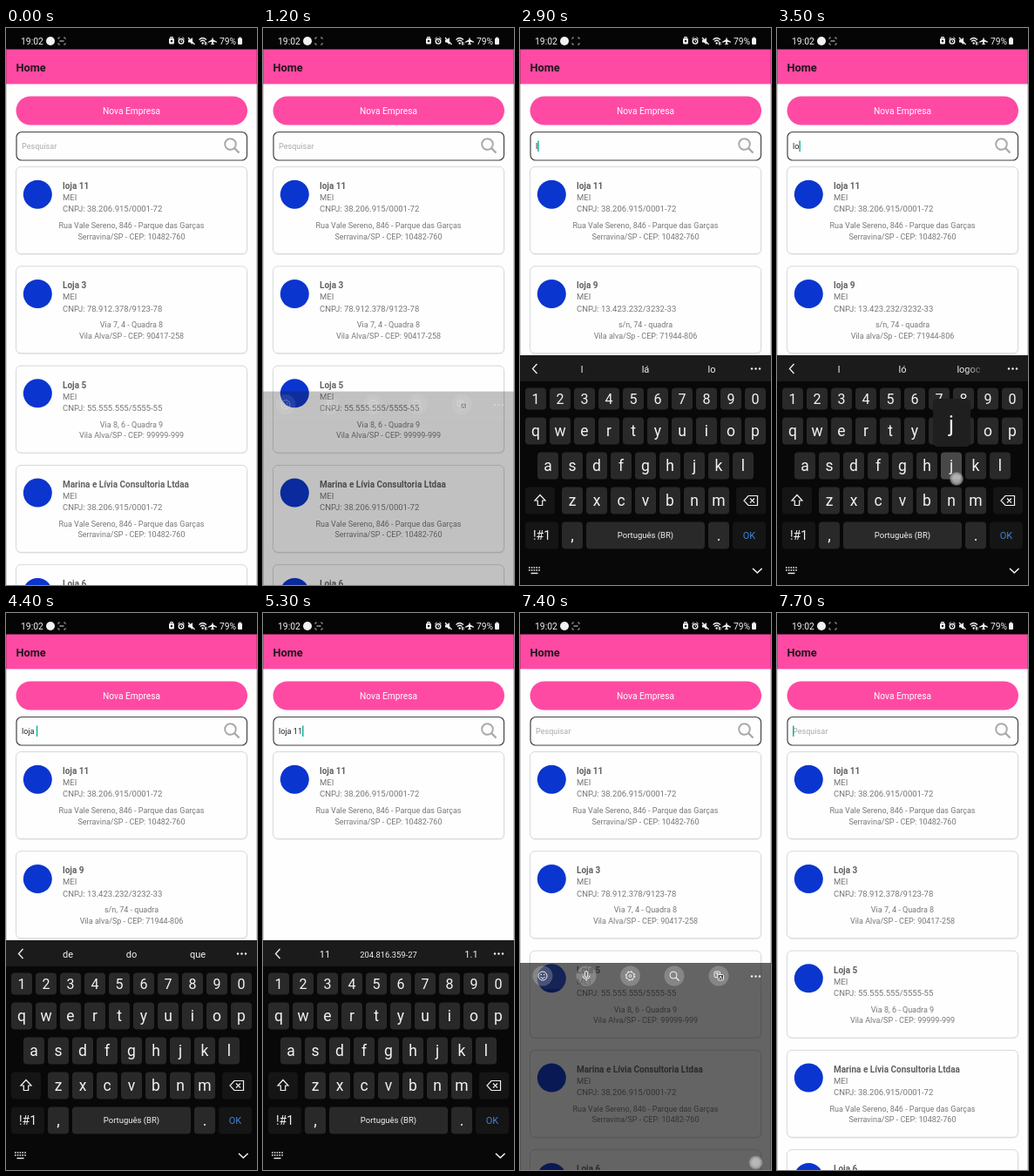
Write an HTML page that moves like this. It is 288 by 640 pixels and loops after 7800 ms.

```html
<!DOCTYPE html>
<html lang="pt-BR">
<head>
<meta charset="utf-8">
<title>Home</title>
<style>
html, body { margin: 0; width: 100%; height: 100%; overflow: hidden; background: #fefefe; }
svg { display: block; width: 288px; height: 640px; font-family: Roboto, sans-serif; }
</style>
</head>
<body>
<svg id="stage" viewBox="0 0 288 640"></svg>
<script>
const LOOP = 7800, STEP = 100;
const stage = document.getElementById('stage');
const ruler = document.createElement('canvas').getContext('2d');
const PINK = '#ff4aa4', WHITE = '#f2f2f2';

// Drawing helpers
const rect = (x, y, w, h, r, fill, more = '') =>
  `<rect x="${x}" y="${y}" width="${w}" height="${h}" rx="${r}" fill="${fill}" ${more}/>`;
const circle = (x, y, r, fill, more = '') => `<circle cx="${x}" cy="${y}" r="${r}" fill="${fill}" ${more}/>`;
const text = (s, x, y, size, fill, more = '') =>
  `<text x="${x}" y="${y}" font-size="${size}" fill="${fill}" ${more}>${s}</text>`;
const mid = (s, x, y, size, fill, more = '') => text(s, x, y, size, fill, 'text-anchor="middle" ' + more);
const line = (d, color = WHITE, w = 1, more = '') =>
  `<path d="${d}" fill="none" stroke="${color}" stroke-width="${w}" ${more}/>`;
const group = (s, more) => `<g ${more}>${s}</g>`;
const clamp = v => Math.max(0, Math.min(1, v));

// Companies: name, tax number, street, city
const first = ['loja 11', '38.206.915/0001-72', 'Rua Vale Sereno, 846 - Parque das Garças', 'Serravina/SP - CEP: 10482-760'];
const allCards = [
  first,
  ['Loja 3', '78.912.378/9123-78', 'Via 7, 4 - Quadra 8', 'Vila Alva/SP - CEP: 90417-258'],
  ['Loja 5', '55.555.555/5555-55', 'Via 8, 6 - Quadra 9', 'Vila Alva/SP - CEP: 99999-999'],
  ['Marina e Lívia Consultoria Ltdaa', '38.206.915/0001-72', first[2], first[3]],
  ['Loja 6', '66.666.666/6666-66', 'Via 9, 2 - Quadra 7', 'Vila Alva/SP - CEP: 88888-888']
];
const loCards = [first, ['loja 9', '13.423.232/3232-33', 's/n, 74 - quadra', 'Vila alva/Sp - CEP: 71944-806']];

// Typing
const WORD = 'loja 11';
const taps = [2700, 3000, 3400, 3800, 4200, 4500, 4800];
const PRESS = 200;
const edits = [...taps.map(t => t + PRESS), ...taps.map((_, i) => 5800 + 150 * i)];
const LONG = '204.816.359-27';
const hints = {
  1: ['l', 'lá', 'lo'], 2: ['l', 'ló', 'logoc'], 3: ['loj', 'loja', 'lojas'], 4: ['loja', 'lojas', 'Loja'],
  5: ['de', 'do', 'que'], 6: ['1', '10', '1.1'], 7: ['11', LONG, '1.1']
};

const rows = [['1234567890', 18, 426, 25], ['qwertyuiop', 18, 463, 31], ['asdfghjkl', 32, 503, 31], ['zxcvbnm', 60, 543, 31]];
const keyAt = { ' ': [144, 583] };
for (const [chars, x, y] of rows) [...chars].forEach((c, i) => keyAt[c] = [x + 28 * i, y]);

// Touches: start, end, x, y
const touches = [
  [900, 1200, 170, 137],
  ...taps.map((t, i) => [t, t + PRESS, keyAt[WORD[i]][0] + 6, keyAt[WORD[i]][1] + 15]),
  [5700, 6800, 261, 543],
  [7100, 7500, 270.5, 631.5]
];

function statusBar(t) {
  const recording = t < 200 || (t >= 2700 && t % 1000 < 600);
  return rect(0, 0, 288, 24.5, 0, '#050505') + text('19:02', 17, 18.5, 10.4, WHITE) + circle(51, 15, 5, WHITE) +
    line('M60 13v-2h2M66 11h2v2M68 17v2h-2M62 19h-2v-2', '#999') + (recording ? line('M61.5 15h5', '#999', 1.5) : '') +
    rect(187, 11.5, 6, 7, 1.5, WHITE) + line('M188.5 11.5v-1h3v1') + circle(190, 15, 1.2, '#111') +
    circle(201, 15.3, 2.8, 'none', `stroke="${WHITE}" stroke-width="1.4"`) + line('M197.5 12.5l2-2M202.5 10.5l2 2M201 14v1.5h1') +
    `<path d="M209 13.5h2l3-2.5v8l-3-2.5h-2z" fill="${WHITE}"/>` + line('M209 11l7.5 8', WHITE, 1.2) +
    line('M221.5 13.5q4-4 8.5 0M223 15.5q2.7-2.5 5.5 0', WHITE, 1.2) + circle(225.7, 17.5, 1.2, WHITE) + line('M228.5 16v3.5M230 19.5v-3.5') +
    `<path d="M237 10.5l1 3 4 2.2v1l-4-1v2l1.3 1.3h-4.6l1.3-1.3v-2l-4 1v-1l4-2.2z" fill="${WHITE}"/>` +
    text('79%', 245, 18.5, 10.3, WHITE) + rect(266, 11.5, 5, 7.5, 1, WHITE) + rect(267.5, 10.5, 2, 1.5, 0, WHITE);
}

function card([name, tax, street, city], i) {
  const y = 159.5 + 114.3 * i, ink = '#777';
  return rect(11.5, y + 1.5, 266, 100, 6, '#0000000d') +
    rect(11.5, y, 265, 100, 5.5, '#fefefe', 'stroke="#d6d8da"') +
    circle(36.3, y + 31.7, 16.5, '#0a35cf') +
    text(name, 65, y + 25.5, 10, '#626262', 'font-weight="700"') +
    text('MEI', 65, y + 38.5, 9.5, ink) + text('CNPJ: ' + tax, 65, y + 51.7, 9.5, ink) +
    mid(street, 144, y + 70.5, 9, ink) + mid(city, 144, y + 83, 9, ink);
}

function page(typed, caretOn) {
  const cards = !typed ? allCards : typed.includes('1') ? [first] : loCards;
  ruler.font = '9.1px Roboto, sans-serif';
  const caretX = 18 + ruler.measureText(typed).width;
  return rect(0, 24, 288, 40.4, 0, PINK) + text('Home', 11.5, 49.5, 12.8, '#20151b', 'font-weight="700"') +
    rect(11.5, 78.5, 265.5, 33, 16.5, PINK) + mid('Nova Empresa', 144, 99, 10.2, '#fff') +
    rect(12, 119.5, 264.5, 32.5, 6, '#fefefe', 'stroke="#444" stroke-width="1.2"') +
    text(typed || 'Pesquisar', 18, 139, 9.1, typed ? '#222' : '#aaa') +
    (caretOn ? rect(caretX, 129.5, 1.5, 12.5, 0, '#16b59b') : '') +
    circle(257.5, 133.5, 6.3, 'none', 'stroke="#aaa" stroke-width="2"') + line('M262 138l5.5 5.5', '#aaa', 2.4) +
    cards.map(card).join('') + line('M.5 25v615M287.5 25v615', '#00000030');
}

function toolIcons() {
  const discs = [26, 76, 126.5, 177, 228].map(x => circle(x, 391, 11.5, '#fff', 'fill-opacity=".22"')).join('');
  const ring = (x, y, r, more = '') => circle(x, y, r, 'none', `stroke="${WHITE}" ${more}`);
  return discs +
    ring(26, 391, 5) + line('M23.5 392q2.5 3.5 5 0') + circle(24.2, 389.5, .8, WHITE) + circle(27.8, 389.5, .8, WHITE) +
    rect(74.3, 385.5, 3.4, 7, 1.7, 'none', `stroke="${WHITE}"`) + line('M72 390.5q0 4 4 4t4-4M76 394.5v2.5') +
    ring(126.5, 391, 4.5) + ring(126.5, 391, 5.3, 'stroke-dasharray="2 2.16"') + ring(126.5, 391, 1.5) +
    ring(176, 390, 4) + line('M179 393l3.5 3.5', WHITE, 1.2) +
    rect(223, 386, 6.5, 6.5, 1, 'none', `stroke="${WHITE}"`) + rect(227, 389.5, 6.5, 6.5, 1, '#444', `stroke="${WHITE}"`) +
    line('M228.5 395l1.7-4 1.7 4M224.5 388h3.5M226.3 388v3');
}

function hintBar(words) {
  return line('M19.5 386l-5 5.5 5 5.5', WHITE, 1.3) +
    words.map((w, i) => mid(w, [71, 144, w.length > 8 ? 216.5 : w === '1.1' ? 239 : 220][i], 395.5,
      w === LONG ? 9.4 : w.length > 8 ? 11.8 : 11, w === 'logoc' ? 'url(#fade)' : WHITE)).join('');
}

function keys(pressed) {
  const KEY = '#292929', SIDE = '#151515';
  let s = '';
  for (const [chars, , , h] of rows) for (const c of chars) {
    const [x, y] = keyAt[c];
    s += rect(x - 12, y - h / 2, 24, h, 4, c === pressed ? '#484848' : KEY) + mid(c, x, y + 5.5, h < 30 ? 16 : 17.5, WHITE);
  }
  const wide = (x, y, w, fill) => rect(x, y, w, 31, 4, fill);
  s += wide(6, 527.5, 34, SIDE) + line('M23 536.5l6 6.5h-3.3v5.5h-5.4v-5.5h-3.3z', WHITE, 1.2) +
    wide(248, 527.5, 34, SIDE) + line('M262 537.5h10.5v11h-10.5l-5-5.5zM264 540.5l5 5M269 540.5l-5 5', WHITE, 1.2) +
    wide(6, 567.5, 38, SIDE) + mid('!#1', 25, 588, 14, WHITE) +
    wide(48, 567.5, 24, KEY) + mid(',', 60, 589, 18, WHITE) +
    wide(76, 567.5, 136, pressed === ' ' ? '#484848' : KEY) + mid('Português (BR)', 144, 586, 9.5, WHITE) +
    wide(216, 567.5, 24, KEY) + mid('.', 228, 589, 18, WHITE) +
    wide(244, 567.5, 38, SIDE) + mid('OK', 263, 587, 11, '#3f83d8') +
    line('M10 620h13M10 623h13', WHITE, 1.6, 'stroke-dasharray="1.6 1.2"') + line('M12.5 626.5h8', WHITE, 1.4) +
    line('M267 621l5.3 5 5.3-5', WHITE, 1.6);
  if (pressed && pressed !== ' ') {
    const [x, y] = keyAt[pressed], left = Math.max(3, x - 21);
    s += rect(left, y - 77, 43, 55, 5, '#1f1f1f') + mid(pressed, left + 21, y - 39, 25, WHITE);
  }
  return s;
}

function keyboard(open, typed, t, pressed) {
  if (!open) return '';
  const words = t >= 5800 ? ['11', LONG, '192.168.1.1'] : hints[typed.length];
  const dots = [266, 270.5, 275].map(x => circle(x, 391.5, 1.2, WHITE)).join('');
  return group(
    rect(0, 376, 288, 30, 0, '#1b1b1b', `opacity="${clamp(open * 1.35)}"`) +
    rect(0, 406, 288, 300, 0, '#080808', `opacity="${clamp(open * 1.25)}"`) +
    group((typed ? hintBar(words) : toolIcons()) + dots, `opacity="${clamp(open * 2)}"`) +
    group(keys(pressed), `opacity="${clamp(open * 2 - 1)}"`),
    `transform="translate(0 ${(1 - open) * 52})"`);
}

const touchDots = t => touches.filter(([a, b]) => t >= a && t < b)
  .map(([, , x, y]) => circle(x, y, 8, 'url(#touch)')).join('');

const defs = `<defs>
<radialGradient id="touch"><stop offset=".5" stop-color="#ccc" stop-opacity=".8"/><stop offset=".8" stop-color="#bbb" stop-opacity=".65"/><stop offset="1" stop-color="#aaa" stop-opacity=".25"/></radialGradient>
<linearGradient id="fade"><stop offset=".4" stop-color="#eee"/><stop offset="1" stop-color="#555"/></linearGradient></defs>`;

function render(t) {
  const done = edits.filter(e => e <= t);
  const count = done.length <= WORD.length ? done.length : 2 * WORD.length - done.length;
  const typed = WORD.slice(0, count);
  const lastEdit = done.length ? done[done.length - 1] : 2000;
  const caretOn = t >= 2000 && (t - lastEdit) % 1000 < 500;
  const open = clamp(t < 4000 ? (t - 1100) / 500 : (7600 - t) / 400);
  const pressed = WORD[taps.findIndex(a => t >= a && t < a + PRESS)];
  stage.innerHTML = defs + page(typed, caretOn) + statusBar(t) + keyboard(open, typed, t, pressed) + touchDots(t);
}

let shown = -1;
const start = performance.now();
function tick() {
  const t = Math.floor((performance.now() - start) % LOOP / STEP) * STEP;
  if (t !== shown) render(shown = t);
  requestAnimationFrame(tick);
}
tick();
</script>
</body>
</html>
```
